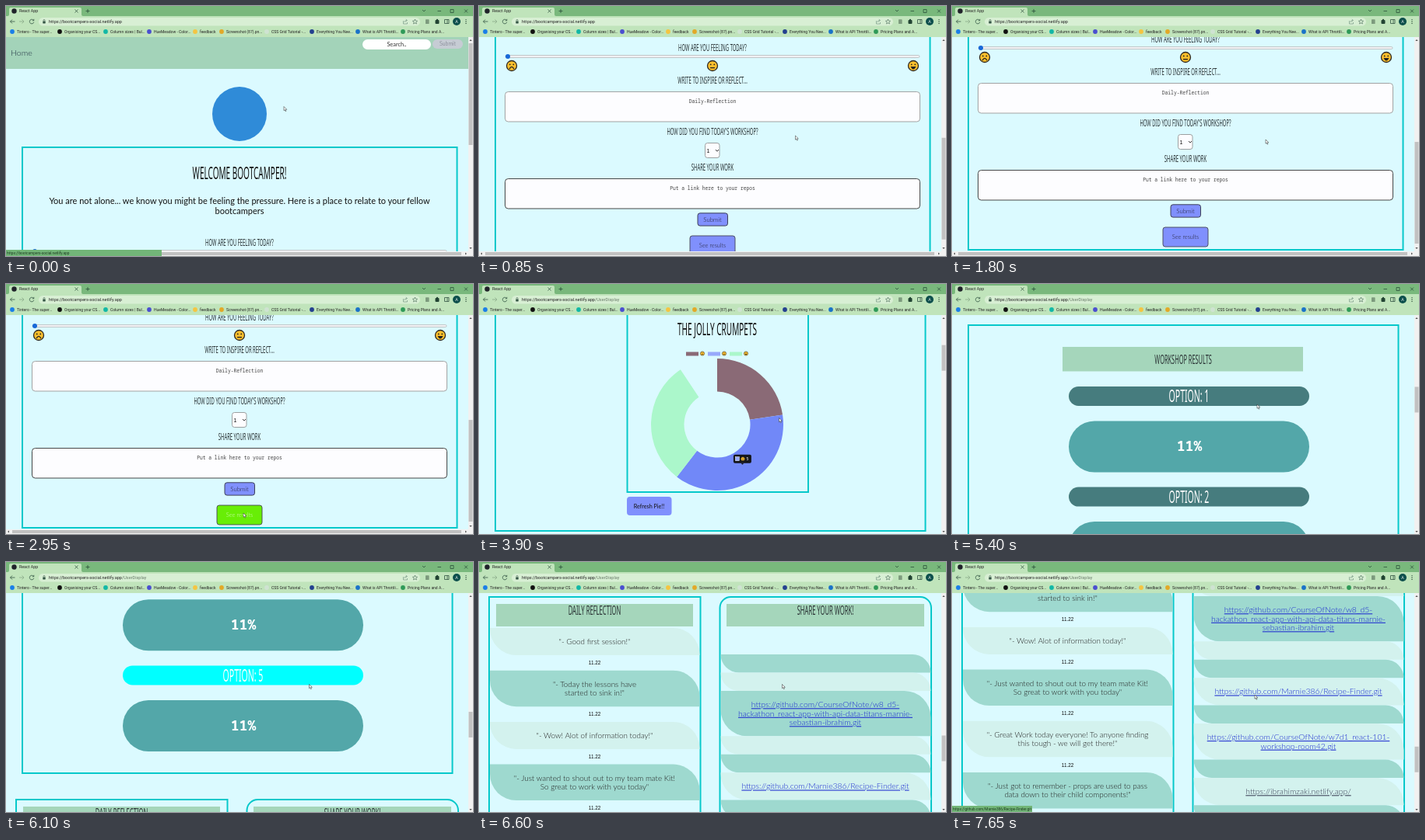
An HTML page for the animation above (8000 ms loop, 600 by 322 pixels).

```html
<!DOCTYPE html>
<html lang="en">
<head>
<meta charset="utf-8">
<title>React App</title>
<style>
  html, body { margin: 0; width: 100%; height: 100%; overflow: hidden; background: #dbfaff; }
  svg { display: block; width: 600px; height: 322px; }
  .ui { font-family: Roboto, "Open Sans", sans-serif; }
  .body { font-family: Lato, sans-serif; font-weight: 300; }
  .firm { font-weight: 400; }
  .mono { font-family: "Noto Sans Mono", monospace; }
  /* tall, narrow lettering for all headings */
  .hand { font-family: "Noto Sans", sans-serif; text-transform: uppercase; transform: scaleX(.478); transform-box: fill-box; transform-origin: center; }
  .date { font-family: "Liberation Sans", sans-serif; }
  .link { text-decoration: underline; }
</style>
</head>
<body>
<svg id="stage" viewBox="0 0 600 322"></svg>
<script>
const TEAL = '#06c8ca', DARK = '#9ed9cf', PALE = '#d3f2ee', MINT = '#a5d6bb', BLUE = '#8090fd';
const byId = id => document.getElementById(id);

// Shape helpers; text y is the middle of the line
const rect = (x, y, w, h, fill, r = 0, more = '') =>
  `<rect x="${x}" y="${y}" width="${w}" height="${h}" rx="${r}" fill="${fill}" ${more}/>`;
const frame = (x, y, w, h, r = 0) => rect(x, y, w, h, 'none', r, `stroke="${TEAL}" stroke-width="2"`);
const dot = (x, y, r, fill) => `<circle cx="${x}" cy="${y}" r="${r}" fill="${fill}"/>`;
const line = (d, stroke = '#263', w = .8, fill = 'none') => `<path d="${d}" fill="${fill}" stroke="${stroke}" stroke-width="${w}"/>`;
const text = (x, y, s, size, cls, fill = '#222', anchor = 'middle', more = '') =>
  `<text x="${x}" y="${y + size * .35}" font-size="${size}" class="${cls}" fill="${fill}" text-anchor="${anchor}" ${more}>${s}</text>`;
const hand = (x, y, s, size, fill = '#2b3436') => text(x, y, s, size, 'hand', fill);

// mood: -1 sad, 0 neutral, 1 happy
function face(x, y, r, mood) {
  const m = y + r * (.4 - mood * .1), bend = mood * r * .7;
  return `<circle cx="${x}" cy="${y}" r="${r}" fill="#fdbf2d" stroke="#2d2a26" stroke-width="${r * .2}"/>` +
    dot(x - r * .35, y - r * .25, r * .14, '#222') + dot(x + r * .35, y - r * .25, r * .14, '#222') +
    line(`M${x - r * .45} ${m - bend * .2}Q${x} ${m + bend} ${x + r * .45} ${m - bend * .2}`, '#222', r * .2, mood > 0 ? '#222' : 'none');
}

function home() {
  const field = (y, s, stroke) =>
    rect(33.5, y, 533, 38.5, '#fdfdff', 4, `stroke="${stroke}" stroke-width=".9"`) + text(300, y + 12.5, s, 6.3, 'mono', '#444');
  return rect(0, 40, 594, 41, '#a3d3b9') +
    text(6, 60, 'Home', 10.6, 'body', '#234', 'start') +
    rect(458, 43, 88, 13, '#fff', 6.5) + text(502, 49.5, 'Search..', 7.4, 'body firm', '#333') +
    rect(548, 43, 39, 12, '#c6ccd4', 6) + text(567.5, 49, 'Submit', 7, 'body', '#667') +
    dot(300, 139, 35, '#2f8bd8') +
    frame(21, 182, 558.5, 394) +
    hand(300, 215.5, 'Welcome Bootcamper!', 21, '#111') +
    text(300, 251.5, 'You are not alone... we know you might be feeling the pressure. Here is a place to relate to your fellow', 11, 'body firm', '#111') +
    text(300, 264, 'bootcampers', 11, 'body firm', '#111') +
    hand(300, 305, 'How are you feeling today?', 12.3) +
    rect(34, 314.5, 532, 3, '#f1f1f4', 1.5, 'stroke="#aaa" stroke-width=".6"') + dot(37, 316, 3, '#1768d8') +
    face(42, 328, 6.5, -1) + face(300, 328, 6.5, 0) + face(558, 328, 6.5, 1) +
    hand(300, 347, 'Write to inspire or reflect...', 12.3) +
    field(361.5, 'Daily-Reflection', '#999') +
    hand(300, 412.5, "How did you find today's workshop?", 12.3) +
    rect(290.5, 427.5, 18.5, 19, '#fdfdff', 3, 'stroke="#888" stroke-width=".8"') +
    text(294.5, 437.5, '1', 7, 'date', '#111') + line('M304 436l2 2.2l2-2.2', '#222', .9) +
    hand(300, 458.5, 'Share Your Work', 12.3) +
    field(473.5, 'Put a link here to your repos', '#333') +
    rect(281, 517.8, 38.5, 16.3, BLUE, 3, 'stroke="#334" stroke-width=".9"') + text(300, 526, 'Submit', 7.8, 'body', '#223') +
    `<g id="results">${rect(271, 547, 58, 25, BLUE, 3, 'stroke="#445" stroke-width=".9"')}${text(300, 559.5, 'See results', 7.4, 'body', '#223')}</g>`;
}

const leaf = (x, y, w, h, fill) => {
  const r = Math.min(h, 34);
  return `<path d="M${x} ${y}h${w - r}a${r} ${r} 0 0 1 ${r} ${r}v${h - r}h${r - w}a${r} ${r} 0 0 1 ${-r} ${-r}z" fill="${fill}"/>`;
};

function lists() {
  const notes = [
    ['"- Good first session!"'],
    ['"- Today the lessons have', 'started to sink in!"'],
    ['"- Wow! Alot of information today!"'],
    ['"- Just wanted to shout out to my team mate Kit!', 'So great to work with you today"'],
    ['"- Great Work today everyone! To anyone finding', 'this tough - we will get there!"'],
    ['"- Just got to remember - props are used to pass', 'data down to their child components!"']];
  const links = [
    ['https://github.com/CourseOfNote/w8_d5-', 'hackathon_react-app-with-api-data-titans-marnie-', 'sebastian-ibrahim.git'], [], [],
    ['https://github.com/Marnie386/Recipe-Finder.git'], [],
    ['https://github.com/CourseOfNote/w7d1_react-101-', 'workshop-room42.git'], [],
    ['https://ibrahimzaki.netlify.app/'], []];
  let out = '', y = 1585;
  const rows = (x, mid, item, size, cls, fill) => item.map((s, j) =>
    text(x, mid + (j - (item.length - 1) / 2) * 11.5, s, size, cls, fill)).join('');
  notes.forEach((item, i) => {
    const h = 23.5 + item.length * 11.5;
    out += leaf(14, y, 269.5, h, i % 2 ? DARK : PALE) + rows(148.5, y + h / 2, item, 9.9, 'body', '#222') +
      text(148.5, y + h + 10, '11.22', 6.3, 'date', '#111');
    y += h + 19.7;
  });
  y = 1666;
  out += leaf(310.5, y - 47, 270, 23.5, DARK) + leaf(310.5, y - 23.5, 270, 23.5, PALE);
  links.forEach((item, i) => {
    const h = 23.5 + item.length * 11.6;
    out += leaf(310.5, y, 270, h, i % 2 ? PALE : DARK) +
      rows(445, y + h / 2, item, 10.4, 'body link', i == 7 ? '#3a3f55' : '#1c2bd0');
    y += h;
  });
  return out;
}

function results() {
  const moods = [-1, 0, 1], tints = ['#8a6a76', '#97a9fb', '#abf7cb'];
  let out = frame(21, 182, 552.5, 398) + frame(190.5, 290, 232.5, 240) +
    hand(306, 321, 'The Jolly Crumpets', 21, '#111') + '<g id="pie"></g>' +
    rect(190, 536, 57.5, 24, BLUE, 4) + text(218.5, 548, 'Refresh Pie!!', 7.2, 'body firm', '#111');
  moods.forEach((m, i) => out += rect(266 + 28 * i, 349.5, 16, 5, tints[i]) + face(287 + 28 * i, 351.5, 2.6, m));
  out += frame(21, 775, 552.5, 736) + rect(142, 803, 309, 31.5, MINT) + hand(297, 819.5, 'Workshop Results', 15.5);
  [11, 33, 33, 11, 11].forEach((n, i) => {
    const y = 854 + i * 129.6;
    out += rect(150, y, 309, 25, '#467c7e', 12.5, `id="opt${i}"`) + hand(304.5, y + 12.5, `Option: ${i + 1}`, 22, '#fff') +
      rect(150, y + 44.5, 309, 66, '#53a7a9', 33) + text(305, y + 77, n + '%', 18, 'mono', '#fff', 'middle', 'font-weight="600"');
  });
  return out + frame(13, 1545, 271.5, 800) + frame(309.5, 1545, 271.5, 800, 14) +
    rect(22, 1554, 253, 29, MINT) + rect(318, 1554, 254, 29, MINT) +
    hand(148.5, 1562.5, 'Daily Reflection', 16) + hand(445, 1562.5, 'Share Your Work!', 16) + lists();
}

function browser() {
  const marks = [
    [14, 'Tintero - The super...', '#1a7fe8'], [75, 'Organising your CS...', '#111'], [134, 'Column sizes | Bul...', '#12b8a6'],
    [190, 'HueMeadow - Color...', '#4a4fd0'], [249, 'feedback', '#f4c542'], [283, 'Screenshot (87).pn...', '#e2a928'],
    [341, 'CSS Grid Tutorial -...', '#cfe3d2'], [399, 'Everything You Nee...', '#23408f'], [458, 'What is API Throttli...', '#1a73c8'],
    [516, 'Pricing Plans and A...', '#2f9a58']];
  return rect(0, 0, 600, 40, '#c0e4bb') + rect(0, 0, 600, 13, '#79b87c') +
    '<path d="M2 13q2 0 2-2v-7q0-2 2-2h89q2 0 2 2v7q0 2 2 2z" fill="#c0e4bb"/>' +
    dot(10.5, 6.5, 3.2, '#20232a') + text(17, 6.5, 'React App', 5.3, 'ui', '#222', 'start') +
    line('M88.5 4.5l4 4m0-4l-4 4M105 4v5m-2.5-2.5h5M535 5l2 2l2-2M554.5 6.5h4.5M571 4.5h4v4h-4zM589 4.5l4 4m0-4l-4 4', '#243', .7) +
    line('M11.5 20h-6m2.5-2.5l-2.5 2.5l2.5 2.5', '#354', .8) + line('M17 20h6m-2.5-2.5l2.5 2.5l-2.5 2.5', '#8aa98a', .8) +
    line('M35.5 18.6a2.8 2.8 0 1 0 .3 2.2M35.8 16.8v2h-2', '#354', .8) +
    rect(42, 15, 490, 10.5, '#d8efd4', 5.2) +
    rect(47.3, 19.5, 3.4, 3, '#354', .4) + line('M48 19.5v-1a1 1 0 0 1 2 0v1', '#354', .6) +
    text(55, 20.3, 'https://bootcampers-social.netlify.app<tspan id="path" fill="#6b7d6b"></tspan>', 5.55, 'ui', '#222', 'start') +
    line('M510.5 19v4h5v-2M512 21q0-2.5 3-2.5m-1.2-1.5l1.7 1.5l-1.7 1.5', '#687', .6) +
    line('M525.5 17l.9 2.1 2.2.2-1.7 1.5.5 2.2-1.9-1.2-1.9 1.2.5-2.2-1.7-1.5 2.2-.2z', '#465', .6) +
    rect(539, 17.3, 4.6, 5.8, '#7c9a7d', .6) + rect(551.5, 18, 5, 5, '#243', 1) + dot(554, 17.9, 1.1, '#243') +
    line('M563.5 17.5h5.5v5h-5.5zM567 17.5v5', '#354', .8) +
    dot(579, 20, 5, '#0d4f4c') + text(579, 20, 'A', 5.2, 'ui', '#fff') +
    [17.6, 20, 22.4].map(y => dot(591, y, .7, '#243')).join('') +
    marks.map(([x, s, c]) => dot(x - 6, 33, 2.9, c) + text(x, 33.2, s, 5, 'ui', '#222', 'start')).join('');
}

byId('stage').innerHTML = rect(0, 0, 600, 322, '#dbfaff') +
  `<g id="home">${home()}</g><g id="show">${results()}</g>` +
  `<g id="hbar">${rect(0, 316, 600, 6, '#f1f1f1')}${rect(8, 317, 577, 4, '#c1c1c1')}<path d="M4 317.5v3l-2-1.5zM590 317.5v3l2-1.5z" fill="#555"/></g>` +
  rect(594, 40, 6, 282, '#f1f1f1') + rect(594.5, 48, 5, 131, '#c1c1c1', 0, 'id="thumb"') +
  '<path d="M595.3 45h3.4l-1.7-2z" fill="#555"/><path id="down" d="M595.3 0h3.4l-1.7 2z" fill="#555"/>' +
  `<g id="status">${rect(0, 314, 0, 8, '#72b678', 0, 'id="statusBox"')}<text id="statusText" x="1" y="319.6" font-size="4.75" class="ui" fill="#1c3a20"></text></g>` +
  browser() +
  '<path id="arrow" d="M0 0v5.2l1.2-1l.9 2l.8-.4l-.8-2h1.7z" fill="#fff" stroke="#222" stroke-width=".5"/>';

// Keys are [time, value...]; each stretch eases in and out
function track(keys, t) {
  const i = keys.findIndex(k => k[0] > t);
  if (i < 0) return keys[keys.length - 1].slice(1);
  if (i == 0) return keys[0].slice(1);
  const a = keys[i - 1], b = keys[i];
  let u = (t - a[0]) / (b[0] - a[0]);
  u *= u * (3 - 2 * u);
  return a.slice(1).map((v, j) => v + (b[j + 1] - v) * u);
}
const SCROLL = [[70, 0], [550, 240], [680, 240], [700, 246], [830, 246], [850, 251], [1100, 262], [4850, 262], [5100, 705],
  [5350, 705], [5400, 722], [5700, 980], [5820, 980], [6100, 1239], [6260, 1239], [6450, 1480], [6600, 1500], [7410, 1500], [7650, 1622]];
const POINTER = [[70, 357, 129.5], [550, 405, 165], [850, 406.5, 167], [1100, 403, 170], [1750, 403, 170], [1800, 403, 172],
  [1950, 403, 172], [2750, 305, 295], [3250, 305, 295], [3850, 385.5, 172.5], [3900, 385.5, 172.5], [4400, 266, 199],
  [4470, 266, 199], [4500, 273, 215], [4850, 273, 215], [5100, 392, 155], [5400, 392, 155], [6100, 389.5, 157.5],
  [6600, 389.5, 157.5], [7450, 389, 171], [7650, 389, 171]];
const CLICK = 3200, CHART = 3454;

function pie(t, px, py) {
  const counts = [3, 5, 4], cx = 306, cy = 443, outer = 85, inner = 42.5;
  const u = Math.min(1, Math.max(0, (t - CHART) / 1000)), sweep = 2 * Math.PI * (1 - (1 - u) ** 4);
  if (!sweep) return '';
  const at = (a, r) => `${(cx + r * Math.sin(a)).toFixed(2)} ${(cy - r * Math.cos(a)).toFixed(2)}`;
  const dist = Math.hypot(px - cx, py - cy), angle = (Math.atan2(px - cx, cy - py) + 2 * Math.PI) % (2 * Math.PI);
  const fills = ['#8a6a76', '#95a8fb', '#abf7cb'], hot = ['#7d5868', '#7188f8', '#8ff5ba'];
  let a = 0, out = '', tip = '';
  counts.forEach((n, i) => {
    const b = a + sweep * n / 12, big = b - a > Math.PI ? 1 : 0;
    const on = dist > inner && dist < outer && angle >= a && angle < b;
    out += `<path d="M${at(a, outer)}A${outer} ${outer} 0 ${big} 1 ${at(b, outer)}L${at(b, inner)}A${inner} ${inner} 0 ${big} 0 ${at(a, inner)}z" fill="${on ? hot[i] : fills[i]}"/>`;
    if (on) {
      const mid = (a + b) / 2, x = cx + 64 * Math.sin(mid), y = cy - 64 * Math.cos(mid) - 11;
      tip = rect(x - 11.5, y - 5.5, 23, 11, '#15161c', 2) + `<path d="M${x - 2} ${y + 5.5}h4l-2 2z" fill="#15161c"/>` +
        rect(x - 9, y - 2.5, 5, 5, fills[i], 0, 'stroke="#fff" stroke-width=".5"') +
        face(x + .5, y, 2.5, i - 1) + text(x + 6.5, y, n, 5, 'date', '#fff');
    }
    a = b;
  });
  return out + tip;
}

function draw(t) {
  const [y] = track(SCROLL, t), [px, py] = track(POINTER, t), second = t >= CLICK;
  const show = (id, on) => byId(id).setAttribute('display', on ? 'inline' : 'none');
  show('home', !second); show('hbar', !second); show('show', second);
  byId(second ? 'show' : 'home').setAttribute('transform', `translate(0 ${-y})`);
  byId('thumb').setAttribute('y', 48 + y * (second ? .117 : .485));
  byId('thumb').setAttribute('height', second ? 33 : 131);
  byId('down').setAttribute('transform', `translate(0 ${second ? 318 : 311})`);
  byId('path').textContent = second ? '/UserDisplay' : '';

  const over = t >= 2750 && t < CLICK, [box, label] = byId('results').children;
  box.setAttribute('fill', over ? '#68ee06' : BLUE);
  label.setAttribute('fill', over ? '#d8ffc0' : '#223');
  byId('opt4').setAttribute('fill', t >= 6080 && t < 6350 ? '#00ffff' : '#467c7e');
  if (second) byId('pie').innerHTML = pie(t, px, py + y);

  const early = t < 300;
  show('status', early || t >= 7600);
  byId('statusBox').setAttribute('width', early ? 200 : 103);
  byId('statusText').textContent = early ? 'https://bootcampers-social.netlify.app' : 'https://github.com/Marnie386/Recipe-Finder.git';
  byId('arrow').setAttribute('transform', `translate(${px} ${py})`);
}

const start = performance.now();
(function tick() {
  draw((performance.now() - start) % 8000);
  requestAnimationFrame(tick);
})();
</script>
</body>
</html>
```
